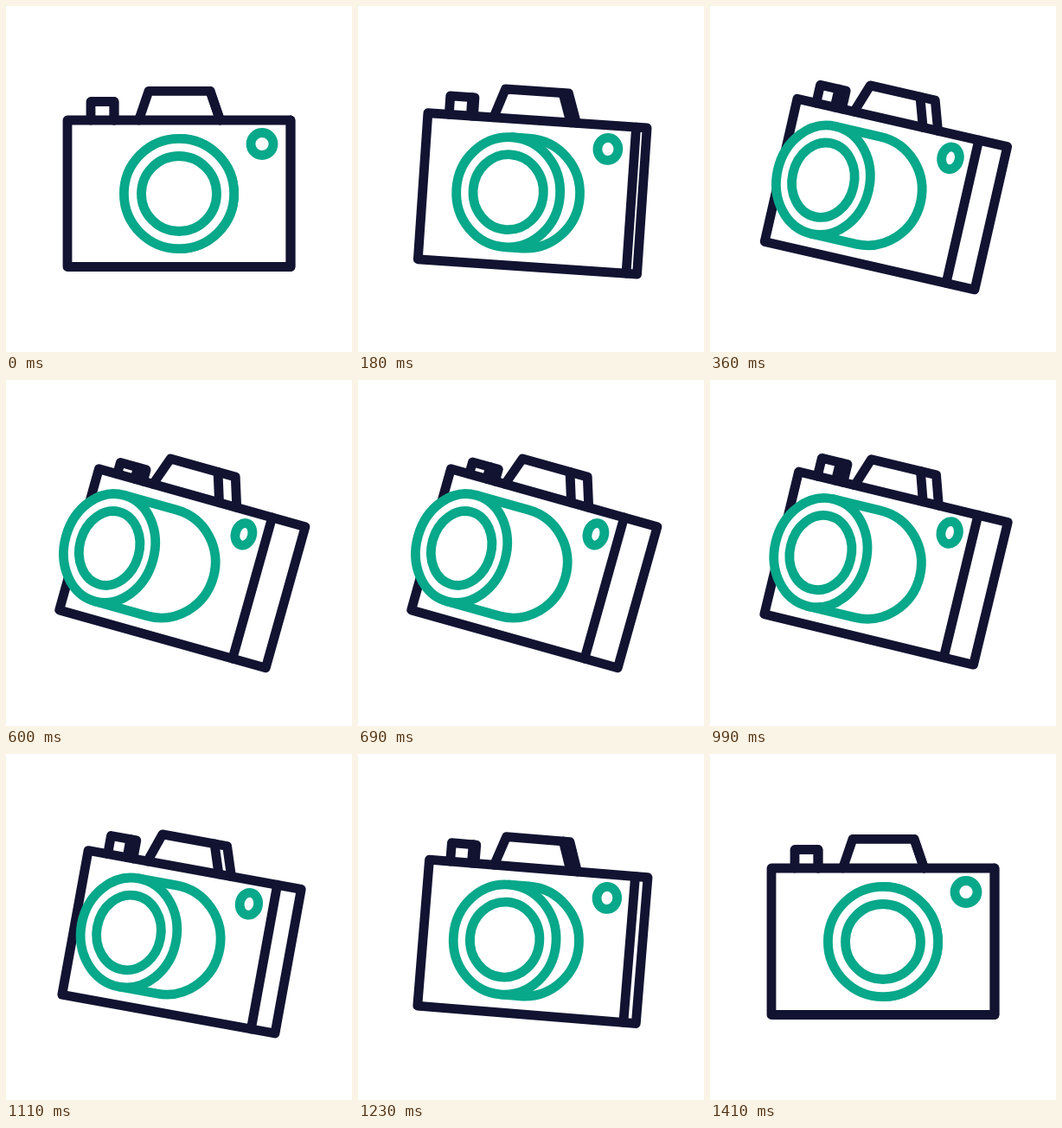
Animation, 400 px wide and 400 px high, one loop 3470 ms. Source, as an HTML page with a canvas:

```html
<!DOCTYPE html>
<html lang="en">
<head>
<meta charset="utf-8">
<title>Camera</title>
<style>
  html, body { margin: 0; width: 100%; height: 100%; overflow: hidden; background: #fff; }
  canvas { display: block; width: 400px; height: 400px; }
</style>
</head>
<body>
<canvas id="stage"></canvas>
<script>
const NAVY = '#121331', GREEN = '#08a88a';
const LOOP = 3470, STEP = 30, END = 1410;
const TILT = 15.66 * Math.PI / 180;

const canvas = document.getElementById('stage');
const dpr = window.devicePixelRatio || 1;
canvas.width = canvas.height = 400 * dpr;
const ctx = canvas.getContext('2d');

const clamp = x => Math.min(1, Math.max(0, x));
const mix = (a, b, k) => a + (b - a) * k;
const span = (t, from, to) => clamp((t - from) / (to - from));
const smooth = x => x * x * (3 - 2 * x);

// cubic-bezier(x1, 0, x2, 1), solved by bisection
function ease(x, x1, x2) {
  let lo = 0, hi = 1;
  for (let i = 0; i < 24; i++) {
    const s = (lo + hi) / 2, r = 1 - s;
    if (3 * r * r * s * x1 + 3 * r * s * s * x2 + s * s * s < x) lo = s;
    else hi = s;
  }
  return smooth((lo + hi) / 2);
}

function tiltAt(t) {
  if (t <= 0 || t >= END) return 0;
  return t < 600 ? ease(t / 600, 0.44, 0.325)
                 : 1 - ease(span(t, 725, END), 0.72, 0.67);
}

const pressAt = t => smooth(span(t, 420, 570)) - smooth(span(t, 660, 840));

function line(...pts) {
  ctx.beginPath();
  pts.forEach(([x, y]) => ctx.lineTo(x, y));
  ctx.stroke();
}

function ring(x, y, rx, ry) {
  ctx.beginPath();
  ctx.ellipse(x, y, rx, ry, 0, 0, Math.PI * 2);
  ctx.fill();
  ctx.stroke();
}

function drawBody(turn, press) {
  const top = -85, bottom = 84.5;
  const left = -129 + 9 * Math.pow(turn, 0.75);
  const right = 129 - 1.2 * turn;
  const edge = 129 - 41 * turn;
  ctx.strokeStyle = NAVY;

  // shutter button
  const cap = -106.5 + 7.7 * press;
  const bl = mix(-102, -98, turn), bf = mix(-75, -77, turn), br = mix(-75, -67, turn);
  line([bl, top], [bl, cap], [br, cap], [br, top]);
  line([bf, cap], [bf, top]);

  // viewfinder hump
  const roof = -118.7, shift = -8.5 * turn, depth = 21 * turn;
  const peak = mix(36, 34.5, turn), foot = mix(47.5, 45.5, turn);
  line([-46.5 + shift, top], [-35 + shift, roof], [peak, roof], [foot, top]);
  line([peak - depth, roof], [foot - depth, top]);

  ctx.strokeRect(left, top, right - left, bottom - top);
  line([edge, top], [edge, bottom]);
}

function drawLens(turn) {
  const r = 63.6, front = -83.5 * turn, back = -20.4 * turn;
  ctx.strokeStyle = GREEN;
  ctx.fillStyle = '#fff';

  ring(mix(96, 61.7, turn), -57.5, 13 - 3.3 * turn, 13);

  // barrel
  ctx.beginPath();
  ctx.moveTo(front, -r);
  ctx.lineTo(back, -r);
  ctx.ellipse(back, 0, r - 2 * turn, r, 0, -Math.PI / 2, Math.PI / 2);
  ctx.lineTo(front, r);
  ctx.fill();
  ctx.stroke();

  ring(front, 0, r - 11.5 * turn, r);
  ring(front, 0, 43.5 - 9 * turn, 43.5);
}

function draw(t) {
  const tilt = tiltAt(t), turn = Math.pow(tilt, 0.83);
  ctx.setTransform(dpr, 0, 0, dpr, 0, 0);
  ctx.fillStyle = '#fff';
  ctx.fillRect(0, 0, 400, 400);
  ctx.translate(200, 217);
  ctx.rotate(TILT * tilt);
  ctx.lineWidth = 10.8;
  ctx.lineJoin = ctx.lineCap = 'round';
  drawBody(turn, pressAt(t));
  drawLens(turn);
}

const start = performance.now();
function tick() {
  const t = (performance.now() - start) % LOOP;
  draw(Math.min(END, Math.floor(t / STEP) * STEP));
  requestAnimationFrame(tick);
}
tick();
</script>
</body>
</html>
```
